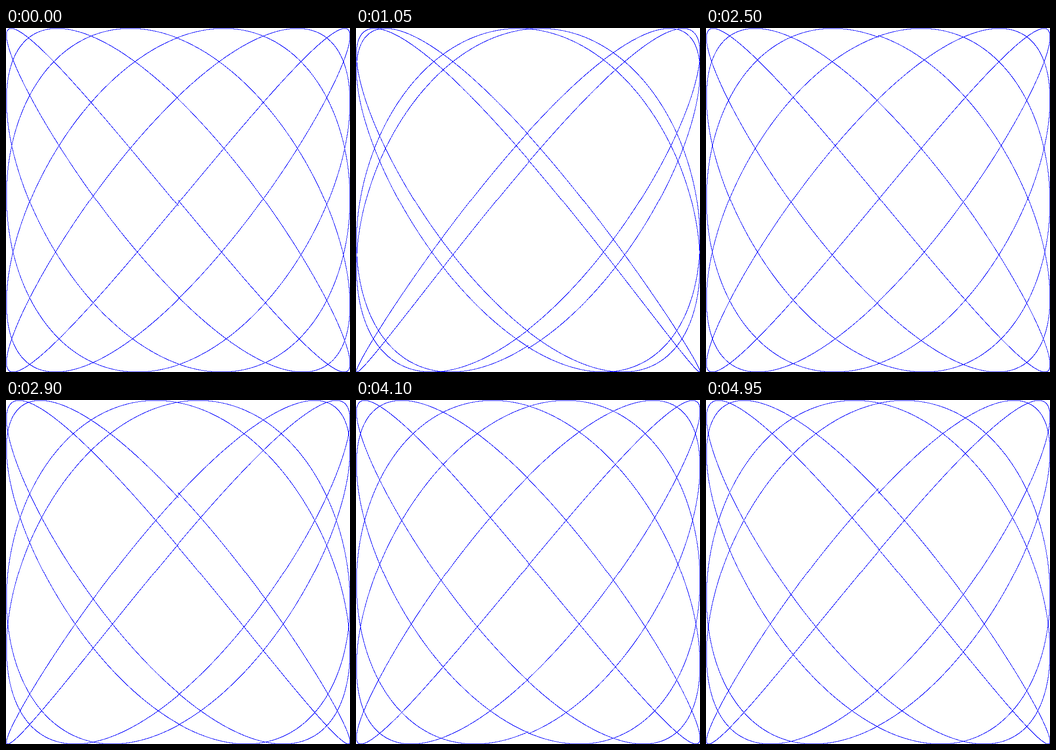
Recreate the animation shown at these times as an HTML page with a canvas. Size 748x748 px, loop 5 s.

```html
<!DOCTYPE html>
<html lang="en">
<head>
<meta charset="utf-8">
<title>Lissajous curve</title>
<style>
  html, body { margin: 0; width: 100%; height: 100%; overflow: hidden; background: #fff; }
  canvas { display: block; }
</style>
</head>
<body>
<canvas id="stage" width="748" height="748"></canvas>
<script>
const RADIUS = 374;
const SIZE = 2 * RADIUS;
const CYCLES = 5;
const RATIO = 1.20109;      // y frequency relative to x
const STEP = 0.001;         // radians between plotted points
const STEP_MS = 50;
const STEP_COUNT = 100;
const PHASE_STEP = 0.1;
const WHITE = 0xffffffff;
const BLUE = 0xffff0000;    // ABGR

const ctx = document.getElementById('stage').getContext('2d');
const image = ctx.createImageData(SIZE, SIZE);
const pixels = new Uint32Array(image.data.buffer);

// Truncation towards zero gives the small kink on the centre lines.
const toPixel = v => RADIUS + Math.trunc(v * RADIUS);

function drawCurve(phase) {
  pixels.fill(WHITE);
  for (let t = 0; t < CYCLES * 2 * Math.PI; t += STEP) {
    const x = toPixel(Math.sin(t));
    const y = toPixel(Math.sin(t * RATIO + phase));
    pixels[y * SIZE + x] = BLUE;
  }
  ctx.putImageData(image, 0, 0);
}

const start = performance.now();
let shown = -1;

function tick() {
  const elapsed = performance.now() - start;
  const index = Math.floor(elapsed / STEP_MS) % STEP_COUNT;
  if (index !== shown) {
    shown = index;
    drawCurve(index * PHASE_STEP);
  }
  requestAnimationFrame(tick);
}
tick();
</script>
</body>
</html>
```
